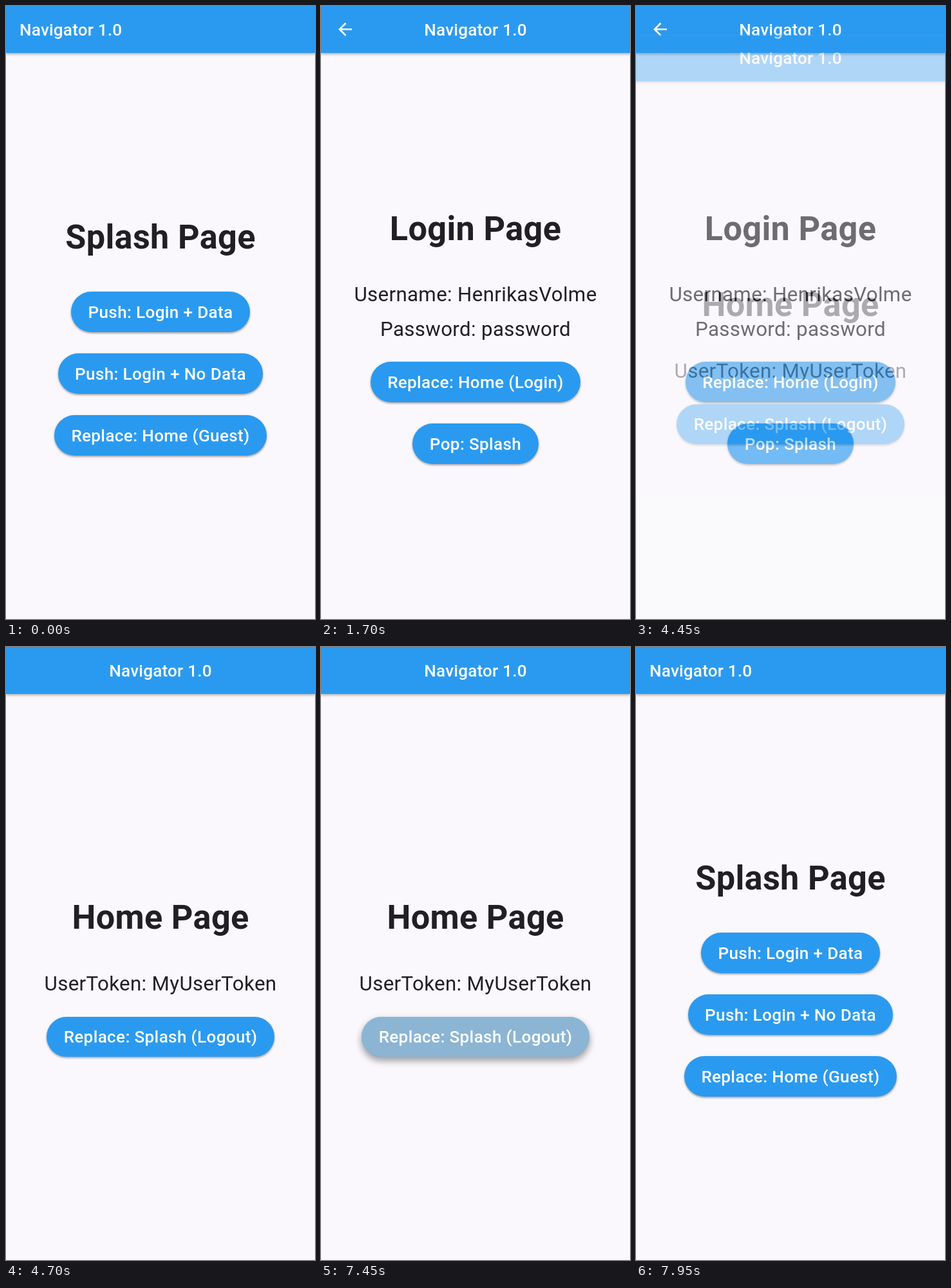
Write an HTML page that moves like this. It is 480 px wide and 953 px high and loops after 8 s.

```html
<!DOCTYPE html>
<html lang="en">
<head>
<meta charset="utf-8">
<title>Page navigation</title>
<style>
  html, body { margin: 0; width: 100%; height: 100%; overflow: hidden; background: #faf8fc; }
  #stage { position: relative; width: 480px; height: 953px; overflow: hidden; }
  .page { position: absolute; inset: 0; background: #faf8fc; }
  .bar { position: absolute; left: 0; top: 0; width: 480px; height: 73px; background: #2a9af0;
         box-shadow: 0 2px 4px rgba(0,0,0,.24), 0 1px 5px rgba(0,0,0,.12); }
  .btn { position: absolute; height: 62.6px; border-radius: 32px; background: #2a9af0; }
  .ink { position: absolute; inset: 0; border-radius: 32px; overflow: hidden; }
  .glow { position: absolute; inset: 0; background: rgba(188,188,188,.4); }
  .wave { position: absolute; border-radius: 50%; background: rgba(200,200,200,.4); }
  svg { position: absolute; left: 0; top: 0; }
  text { font-family: Roboto, "Noto Sans", sans-serif; fill: #211f24; text-anchor: middle; letter-spacing: .33px; }
  .title, .label { font-size: 26.1px; font-weight: 500; fill: #fff; }
  .title { letter-spacing: .2px; }
  .head { font-size: 52.2px; font-weight: 700; }
  .body { font-size: 31.3px; font-weight: 400; }
</style>
</head>
<body>
<div id="stage"></div>
<script>
const LOOP = 8000, STEP = 50, FADE = 200, SLIDE = 300;
const BTN_H = 62.6;
const ARROW = "M20 11H7.83l5.59-5.59L12 4l-8 8 8 8 1.41-1.41L7.83 13H20v-2z";

// Buttons: [label, left, top, width]; the first one of each page is pressed.
const PAGES = [
  { head: ["Splash Page", 376.7], left: true, lines: [],
    buttons: [["Push: Login + Data", 101.2, 444, 277.6],
              ["Push: Login + No Data", 80.7, 540, 318.6],
              ["Replace: Home (Guest)", 74.8, 636, 330.4]],
    press: { down: 30, wave: 110, up: 1290, x: 343, y: 497 } },
  { head: ["Login Page", 363.5], back: true,
    lines: [["Username: HenrikasVolme", 459.4], ["Password: password", 512.6]],
    buttons: [["Replace: Home (Login)", 77, 553.2, 326.4],
              ["Pop: Splash", 142, 649.2, 196]],
    press: { down: 2730, wave: 2800, up: 4290, x: 341, y: 584 } },
  { head: ["Home Page", 438],
    lines: [["UserToken: MyUserToken", 534]],
    buttons: [["Replace: Splash (Logout)", 63.2, 574.6, 353.6]],
    press: { down: 5730, wave: 5800, up: 7540, x: 345, y: 606 } }
];

const clamp = v => Math.max(0, Math.min(1, v));

function bezier(x1, y1, x2, y2) {
  const at = (a, b, s) => 3 * a * s * (1 - s) ** 2 + 3 * b * s * s * (1 - s) + s ** 3;
  return x => {
    if (x <= 0) return 0;
    if (x >= 1) return 1;
    let lo = 0, hi = 1;
    for (let i = 0; i < 24; i++) {
      const mid = (lo + hi) / 2;
      if (at(x1, x2, mid) < x) lo = mid; else hi = mid;
    }
    return at(y1, y2, lo);
  };
}
const moveEase = bezier(.4, 0, .2, 1);
const fadeEase = bezier(.42, 0, 1, 1);

function add(parent, cls) {
  const el = document.createElement("div");
  el.className = cls;
  parent.appendChild(el);
  return el;
}

const textTag = (cls, str, y, x = 240, extra = "") =>
  `<text class="${cls}" x="${x}" y="${y}" ${extra}>${str}</text>`;

function shadow(k) {
  const mix = (a, b) => (a + (b - a) * k).toFixed(2);
  return `0 ${mix(2, 7)}px ${mix(3, 11)}px rgba(0,0,0,${mix(.27, .28)}),` +
         `0 ${mix(1, 3)}px ${mix(4, 12)}px rgba(0,0,0,${mix(.12, .14)})`;
}

function build(p) {
  const el = add(document.getElementById("stage"), "page");
  add(el, "bar");
  let art = p.left
    ? textTag("title", "Navigator 1.0", 45.8, 21, 'style="text-anchor:start"')
    : textTag("title", "Navigator 1.0", 45.8);
  if (p.back) art += `<path d="${ARROW}" fill="#fff" transform="translate(21.8 20.6) scale(1.304)"/>`;
  art += textTag("head", ...p.head);
  for (const line of p.lines) art += textTag("body", ...line);

  p.buttons.forEach(([label, x, y, w], i) => {
    const b = add(el, "btn");
    b.style.cssText = `left:${x}px;top:${y}px;width:${w}px;box-shadow:${shadow(0)}`;
    art += textTag("label", label, (y + 40.6).toFixed(1));
    if (i) return;
    const ink = add(b, "ink");
    p.btn = b;
    p.glow = add(ink, "glow");
    p.wave = add(ink, "wave");
  });
  el.insertAdjacentHTML("beforeend", `<svg width="480" height="953" viewBox="0 0 480 953">${art}</svg>`);
  p.el = el;
}

function drawPress(p, t) {
  const { down, wave, up, x, y } = p.press;
  const [, bx, by, bw] = p.buttons[0];
  const out = clamp((t - up) / FADE);
  const inn = clamp((t - down) / FADE);
  const px = x - bx, py = y - by;
  const reach = Math.hypot(Math.max(px, bw - px), Math.max(py, BTN_H - py));
  const r = reach * clamp((t - wave) / 1000);
  p.glow.style.opacity = inn * (1 - out);
  p.btn.style.boxShadow = shadow(moveEase(inn) * (1 - moveEase(out)));
  const s = p.wave.style;
  s.left = px - r + "px";
  s.top = py - r + "px";
  s.width = s.height = 2 * r + "px";
  s.opacity = 1 - out;
}

function draw(t) {
  const now = PAGES.findIndex(p => t < p.press.up + SLIDE);
  const cur = now < 0 ? 0 : now;
  const moving = now >= 0 && t >= PAGES[now].press.up;
  const next = moving ? (now + 1) % PAGES.length : -1;
  const k = moving ? (t - PAGES[now].press.up) / SLIDE : 0;
  PAGES.forEach((p, i) => {
    const s = p.el.style, top = i === next;
    s.display = top || i === cur ? "block" : "none";
    s.zIndex = top ? 2 : 1;
    s.opacity = top ? fadeEase(k) : 1;
    s.transform = top ? `translateY(${(953 * .25 * (1 - moveEase(k))).toFixed(2)}px)` : "none";
    drawPress(p, t);
  });
}

PAGES.forEach(build);
draw(0);
const start = performance.now();
function tick() {
  const t = (performance.now() - start) % LOOP;
  draw(Math.floor(t / STEP) * STEP);
  requestAnimationFrame(tick);
}
requestAnimationFrame(tick);
</script>
</body>
</html>
```
